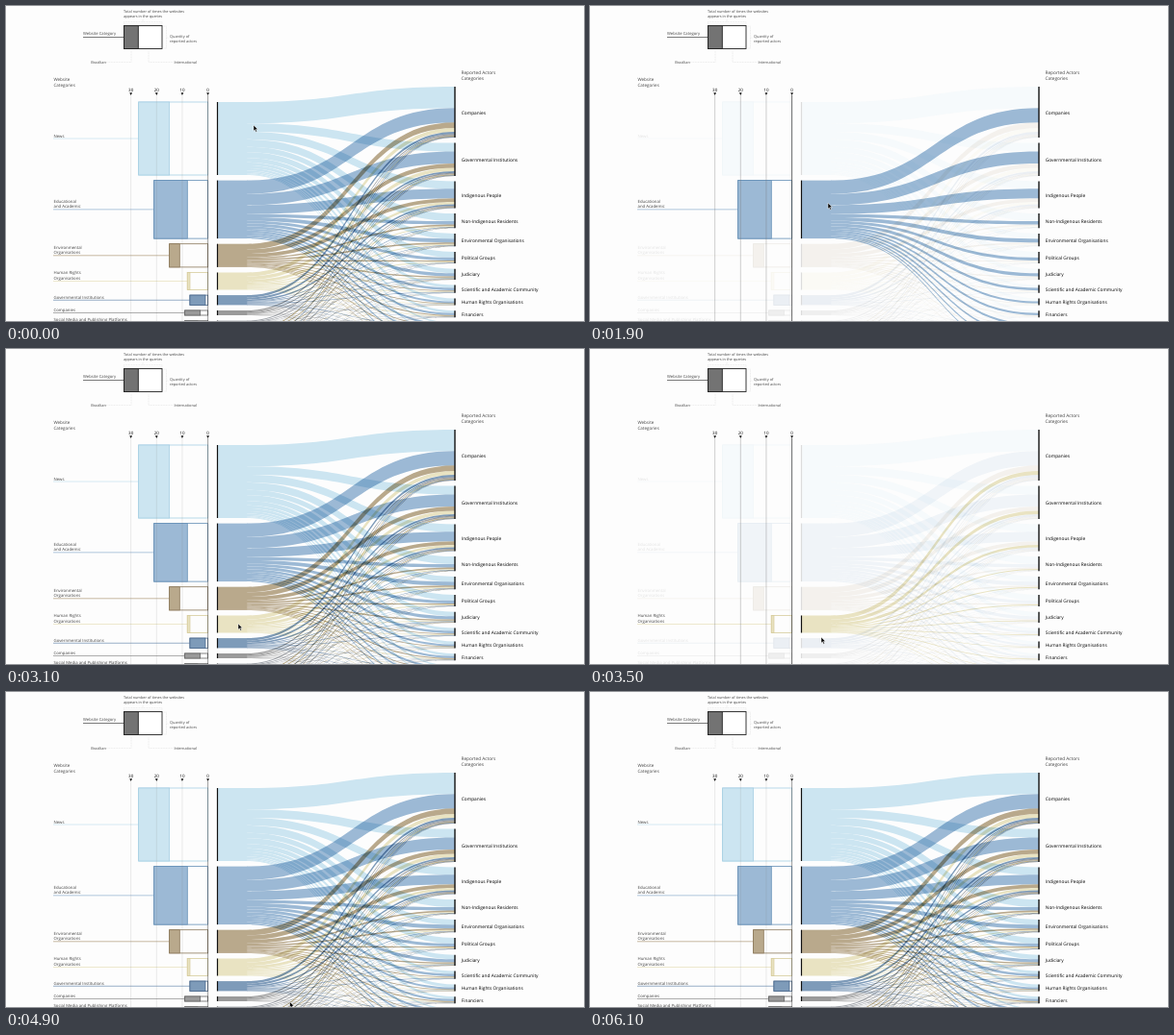
Write an HTML page that moves like this. It is 600 px wide and 328 px high and loops after 6200 ms.

```html
<!DOCTYPE html>
<html lang="en">
<head>
<meta charset="utf-8">
<title>Website categories and reported actors</title>
<style>
  html, body { margin: 0; width: 100%; height: 100%; overflow: hidden; background: #fdfdfd; }
  svg { display: block; width: 100%; height: 100%; }
  text { font-family: "Open Sans", "Noto Sans", sans-serif; text-rendering: geometricPrecision; }
  .source { mix-blend-mode: multiply; }
</style>
</head>
<body>
<svg id="stage" viewBox="0 0 600 328"></svg>
<script>
const LOOP = 6200;
const FADED = 0.14;
const GAP = 5.6;
const AXIS = 209.6, UNIT = 2.665;
const FROM = 219.5, BEND = 250, TO = 466;
const stage = document.getElementById("stage");

// h: band height, total and inner: bar values on the axis
const sources = [
  { h: 76, total: 27, inner: 15, color: "#cee7f3", edge: "#a9d1e5", label: ["News"] },
  { h: 60.5, total: 21, inner: 8, color: "#9dbbd7", edge: "#6791b8", label: ["Educational", "and Academic"] },
  { h: 24.2, total: 15, inner: 11, color: "#bbaa8d", edge: "#8d7a5d", label: ["Environmental", "Organisations"] },
  { h: 18, total: 8, inner: 7, color: "#ebe5c4", edge: "#d9cf9f", label: ["Human Rights", "Organisations"] },
  { h: 10.3, total: 7, inner: 1, color: "#7f9cbb", edge: "#4a6a8e", label: ["Governmental Institutions"] },
  { h: 5, total: 9, inner: 3, color: "#9b9b9b", edge: "#666", label: ["Companies"] },
  { h: 4, total: 9, inner: 4, color: "#a3a7ad", edge: "#777", label: ["Social Media and Publishing Platforms"] },
  ...["#b8a470", "#7890a8", "#999"].map((color, i) => ({ h: 3.6 - i * 0.4, color }))
];

// h: bar height, news: share that comes from the first source
const targets = [
  { h: 53, news: 0.42, label: "Companies" },
  { h: 34.3, news: 0.26, label: "Governmental Institutions" },
  { h: 28, news: 0.28, label: "Indigenous People" },
  { h: 15.2, news: 0.52, label: "Non-Indigenous Residents" },
  { h: 13.4, news: 0.41, label: "Environmental Organisations" },
  { h: 12.2, news: 0.5, label: "Political Groups" },
  { h: 11.2, news: 0.41, label: "Judiciary" },
  { h: 8.3, news: 0.37, label: "Scientific and Academic Community" },
  { h: 7.2, news: 0.43, label: "Human Rights Organisations" },
  { h: 7, news: 0.36, label: "Financiers" },
  ...[6, 5, 4, 3].map(h => ({ h, news: 0.25 }))
];

// start, hovered source (-1 for none), fade time
const hovers = [
  [50, 0, 320], [1110, 1, 190], [1930, 2, 320], [2940, -1, 140],
  [3140, 3, 320], [3680, -1, 170], [4080, 5, 480], [4760, -1, 130]
];

// time, x, y of the pointer tip
const pointerPath = [
  [0, 257, 124], [700, 252, 156], [950, 252, 156], [1100, 249, 187], [1300, 247, 205],
  [1900, 247, 205], [2500, 243, 260], [2950, 243, 260], [3100, 241, 286],
  [3900, 239, 314], [4750, 243, 319], [4900, 294.5, 322.5], [5150, 312, 334]
];

function add(parent, tag, attrs, content) {
  const el = document.createElementNS("http://www.w3.org/2000/svg", tag);
  for (const key in attrs) el.setAttribute(key, attrs[key]);
  if (content) el.textContent = content;
  parent.appendChild(el);
  return el;
}

const rect = (p, x, y, width, height, attrs) => add(p, "rect", { x, y, width, height, ...attrs });
const path = (p, d, stroke, width, extra) =>
  add(p, "path", { d, fill: "none", stroke, "stroke-width": width, ...extra });

function write(p, x, y, lines, size, fill, extra) {
  lines.forEach((line, i) =>
    add(p, "text", { x, y: y + i * size * 1.29, "font-size": size, fill, ...extra }, line));
}

function stack(list, y) {
  for (const item of list) {
    item.y = y;
    y += item.h + GAP;
  }
}

function drawLegend() {
  const pale = { "stroke-dasharray": "1 .6" };
  write(stage, 122, 7, ["Total number of times the websites", "appears in the queries"], 3.85, "#444");
  write(stage, 80, 30.3, ["Website Category"], 4.2, "#444");
  write(stage, 170, 32.6, ["Quantity of", "reported actors"], 3.9, "#444");
  write(stage, 88.3, 60, ["Brazilian"], 3.9, "#444");
  write(stage, 174.5, 60.3, ["International"], 3.9, "#444");
  path(stage, "M80 32.5H122", "#444", 0.7);
  path(stage, "M122.5 18.5V16.5H162V18.5M142 16.5V14M164 21H166.5V44H164M166.5 33H168.5", "#ddd", 0.5, pale);
  path(stage, "M104 58.5H130V46M148 46V58.5H173", "#ddd", 0.5, pale);
  const border = { stroke: "#222", "stroke-width": 0.9 };
  rect(stage, 122.5, 20.5, 39.5, 24, { fill: "#fff", ...border });
  rect(stage, 122.5, 20.5, 14.8, 24, { fill: "#737373", ...border });
}

function drawAxis() {
  write(stage, 49.5, 78, ["Website", "Categories"], 4.5, "#444");
  write(stage, 472.5, 71.3, ["Reported Actors", "Categories"], 4.75, "#444");
  for (let n = 0; n <= 30; n += 10) {
    const x = AXIS - n * UNIT;
    write(stage, x, 88.6, [String(n)], 4.5, "#111", { "text-anchor": "middle", "font-weight": 500 });
    add(stage, "path", { d: `M${x - 1.4} 90.3h2.8l-1.4 2.6z`, fill: "#111" });
  }
}

function drawGrid() {
  const grid = add(stage, "g", {});
  for (let n = 10; n <= 30; n += 10) path(grid, `M${AXIS - n * UNIT} 93V328`, "#777", 0.6);
  return grid;
}

function drawBar(group, s) {
  if (!s.label) return;
  const left = AXIS - s.total * UNIT;
  const middle = s.y + s.h / 2;
  const first = middle - 1.5 - (s.label.length - 1) * 5.6;
  const border = { stroke: s.edge, "stroke-width": 0.8 };
  write(group, 49.5, first, s.label, 4.3, "#444");
  path(group, `M49 ${middle}H${left}`, s.color, 0.8);
  rect(group, left, s.y, s.total * UNIT, s.h, { fill: "#fff", ...border });
  rect(group, left, s.y, (s.total - s.inner) * UNIT, s.h, { fill: s.color, ...border });
}

function ribbon(group, y0, h0, y1, h1, color) {
  const mid = (BEND + TO) / 2;
  const d = `M${BEND} ${y0}C${mid} ${y0} ${mid} ${y1} ${TO} ${y1}v${h1}` +
    `C${mid} ${y1 + h1} ${mid} ${y0 + h0} ${BEND} ${y0 + h0}z`;
  add(group, "path", { d, fill: color });
}

// The first source takes its share of a target; the others split the rest by size.
function flowsOf(index) {
  const weight = s => s.h ** 1.08;
  const others = sources.slice(1).reduce((sum, s) => sum + weight(s), 0);
  return targets.map(t =>
    index ? t.h * (1 - t.news) * weight(sources[index]) / others : t.h * t.news);
}

function drawSources() {
  const used = targets.map(t => t.y);
  return sources.map((s, index) => {
    const group = add(stage, "g", { class: "source" });
    const flows = flowsOf(index);
    const scale = s.h / flows.reduce((a, b) => a + b);
    drawBar(group, s);
    rect(group, FROM, s.y, BEND - FROM + 0.3, s.h, { fill: s.color });
    let y = s.y;
    flows.forEach((h, i) => {
      ribbon(group, y, h * scale, used[i], h, s.color);
      y += h * scale;
      used[i] += h;
    });
    path(group, `M${FROM} ${s.y}v${s.h}`, "#111", 1.2);
    return group;
  });
}

function drawTargets() {
  for (const { y, h, label } of targets) {
    path(stage, `M${TO} ${y}v${h}`, "#111", 1.4);
    if (label) write(stage, 472.8, y + h / 2 + 2, [label], 4.8, "#000", { "font-weight": 500 });
  }
}

stack(sources, 100);
stack(targets, 84);
drawLegend();
drawAxis();
const groups = drawSources();
const grid = drawGrid();
const axisLine = path(stage, `M${AXIS} 93V328`, "#333", 0.8);
drawTargets();
const pointer = add(stage, "path", {
  d: "M0 0V6.1L1.4 4.8L2.4 7.1L3.5 6.6L2.5 4.4H4.4Z",
  fill: "#000", stroke: "#fff", "stroke-width": 0.5
});

const mix = (a, b, k) => a + (b - a) * k;

function hoverAt(t) {
  let before = -1, now = -1, k = 1;
  for (const [start, index, fade] of hovers) {
    if (t < start) break;
    before = now;
    now = index;
    k = Math.min(1, (t - start) / fade);
  }
  return { before, now, k };
}

function pointerAt(t) {
  const i = pointerPath.findIndex(p => p[0] > t);
  if (i < 0) return pointerPath.at(-1).slice(1);
  const [t0, x0, y0] = pointerPath[i - 1], [t1, x1, y1] = pointerPath[i];
  const k = (t - t0) / (t1 - t0);
  return [mix(x0, x1, k), mix(y0, y1, k)];
}

function render(t) {
  const { before, now, k } = hoverAt(t);
  const level = (state, i) => state < 0 || state === i ? 1 : FADED;
  groups.forEach((g, i) => g.setAttribute("opacity", mix(level(before, i), level(now, i), k)));
  const focus = mix(before < 0 ? 0 : 1, now < 0 ? 0 : 1, k);
  grid.setAttribute("opacity", mix(0.25, 0.6, focus));
  axisLine.setAttribute("opacity", mix(0.6, 0.9, focus));
  pointer.setAttribute("transform", `translate(${pointerAt(t)})`);
}

const begin = performance.now();
function tick() {
  render((performance.now() - begin) % LOOP);
  requestAnimationFrame(tick);
}
tick();
</script>
</body>
</html>
```
